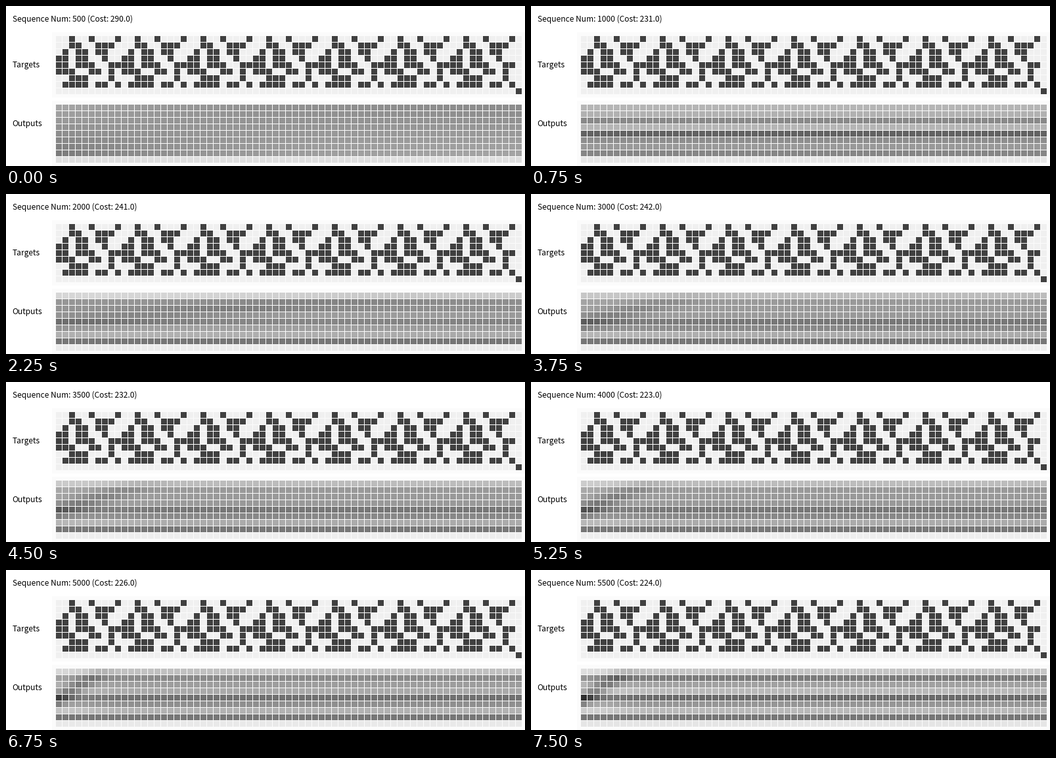
Write a matplotlib script that moves like this. It is 790 by 245 pixels and loops after 8000 ms.

```python
import numpy as np
import matplotlib.pyplot as plt
from matplotlib.animation import FuncAnimation
from matplotlib.collections import PatchCollection
from matplotlib.patches import Rectangle

WIDTH, HEIGHT, DPI = 790, 245, 100
ROWS, COLS, PITCH = 9, 71, 10
LEFT, TARGET_TOP, OUTPUT_TOP = 76, 46, 151
EMPTY, FULL, PANEL = 240, 64, "#fbfbfb"
FRAME_MS, HOLD, FRAMES = 250, 3, 32

# Columns switched on in each row of the repeated target sequence
PATTERN = [(2, 5, 9), (2, 3, 6, 7, 8), (1, 3, 4, 6, 7), (0, 1, 3, 4, 7),
           (0, 1, 3, 4, 5, 8, 9), (0, 1, 2, 5, 6, 8), (2, 3, 4, 8),
           (1, 2, 3, 4, 6, 7, 9)]

COSTS = [290, 231, 236, 241, 241, 242, 232, 223, 225, 226, 224]

# How far the rows stray from their mean at three stages of training
STRAY = {1: (-7, 24, -16, 28, -21, 6, -18, 15, -7),
         3: (17, -12, -12, 0, 11, 18, -2, -1, -3),
         10: (9, -30, 8, 32, -13, 14, 14, -1, -9)}


def target_grid():
    grid = np.full((ROWS, COLS), EMPTY)
    for row, cols in enumerate(PATTERN):
        for col in cols:
            grid[row, col:COLS - 1:10] = FULL
    grid[-1, -1] = FULL
    return grid


TARGETS = target_grid()
MEANS = TARGETS.mean(axis=1, keepdims=True)
ROW, COL = np.mgrid[:ROWS, :COLS]


def untrained():
    """Near-uniform gray whose vertical slope flips along the sequence."""
    fade = np.exp(-COL / 24)
    gray = fade * (165 - 6 * ROW) + (1 - fade) * (138 + 4 * ROW)
    return np.where(ROW < 8, gray, 223)


def ridge(pos):
    """Dark diagonal that sharpens in the first columns as training goes on."""
    gain = np.interp(pos, [1, 3, 5, 7, 10], [0, 0.35, 0.45, 0.65, 1])
    x = COL / np.interp(pos, [3, 5, 7, 9], [8, 2.5, 1.5, 1])
    band = np.exp(-((ROW - 4 + 0.55 * x) / 1.2) ** 2)
    return gain * (25 - 85 * band) * np.exp(-(x / 6) ** 2) * (ROW < 7)


def output_grid(stage):
    # Training nearly stalls between stages 3 and 4
    pos = np.interp(stage, [0, 3, 4, 5, 10], [0, 3, 3.1, 5, 10])
    if pos < 1:
        return untrained()
    weights = {1: np.interp(pos, [1, 3], [1, 0]),
               3: np.interp(pos, [1, 3, 5], [0, 1, 0]),
               10: np.interp(pos, [8, 10], [0, 1])}
    stray = sum(w * np.array(STRAY[key]) for key, w in weights.items())
    return MEANS + stray[:, None] + ridge(pos)


def grays(grid):
    shade = np.clip(grid.ravel() / 255, 0, 1)
    return np.column_stack([shade] * 3 + [np.ones_like(shade)])


def add_panel(ax, top):
    ax.add_patch(Rectangle((LEFT - 6, top - 6), 720, 100, fc=PANEL, lw=0,
                           antialiased=False))
    cells = [Rectangle((LEFT + PITCH * c, top + PITCH * r), PITCH - 1, PITCH - 1)
             for r in range(ROWS) for c in range(COLS)]
    return ax.add_collection(
        PatchCollection(cells, linewidths=0, antialiased=False, zorder=2))


def label(ax, y, text):
    return ax.text(9.7, y, text, family="Noto Sans CJK JP",
                   size=12 * 72 / DPI, color="black", va="baseline")


fig = plt.figure(figsize=(WIDTH / DPI, HEIGHT / DPI), dpi=DPI, facecolor="white")
ax = fig.add_axes([0, 0, 1, 1])
ax.set(xlim=(0, WIDTH), ylim=(HEIGHT, 0))
ax.axis("off")

add_panel(ax, TARGET_TOP).set_facecolor(grays(TARGETS))
outputs = add_panel(ax, OUTPUT_TOP)
title = label(ax, 24, "")
label(ax, 94, "Targets")
label(ax, 184, "Outputs")


def update(frame):
    stage = frame // HOLD
    title.set_text(f"Sequence Num: {500 * (stage + 1)} (Cost: {COSTS[stage]:.1f})")
    outputs.set_facecolor(grays(output_grid(stage)))
    return title, outputs


anim = FuncAnimation(fig, update, frames=FRAMES, interval=FRAME_MS,
                     repeat=True, repeat_delay=0)
plt.show()
```
